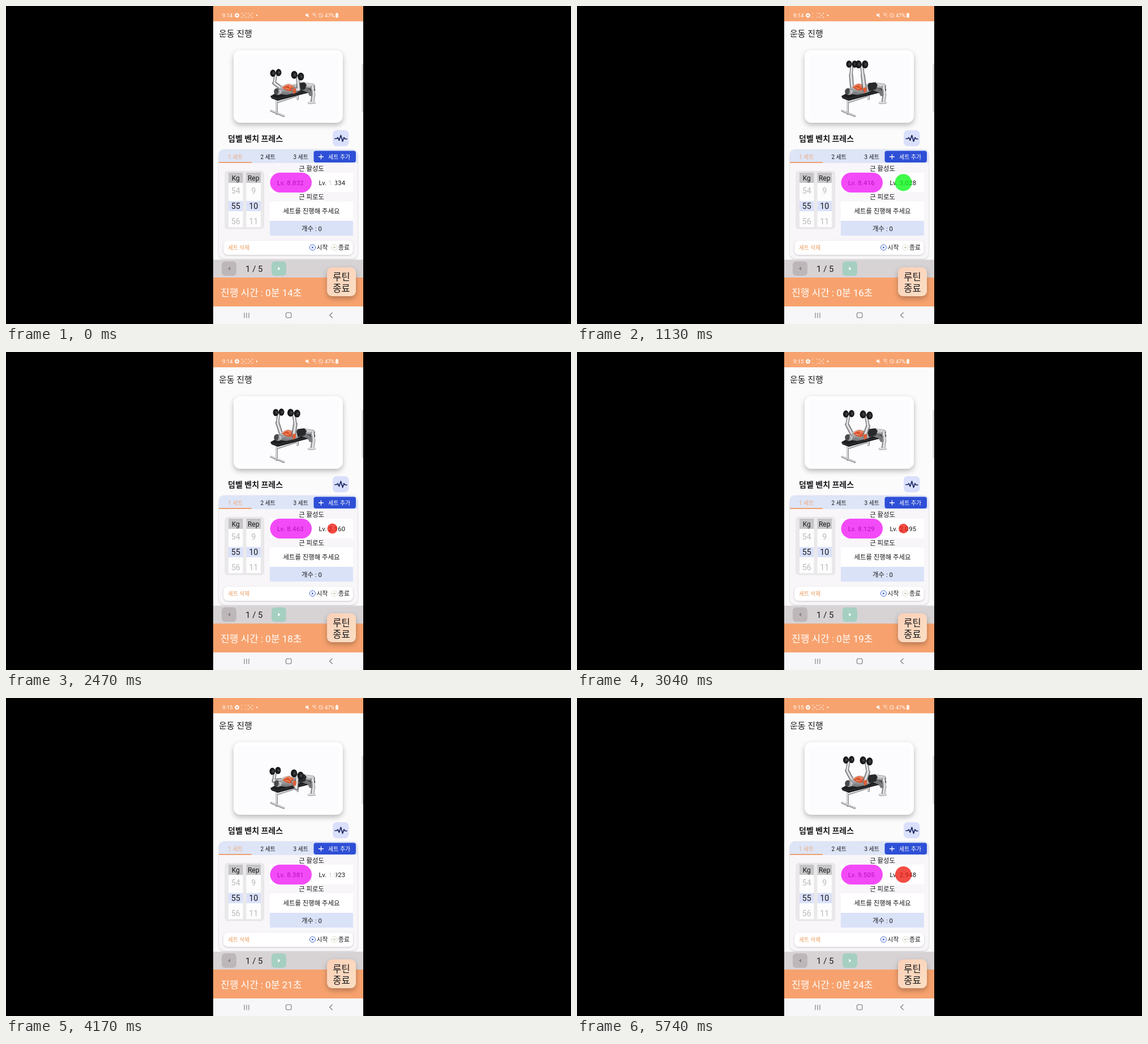
Write an HTML page that moves like this. It is 998 px wide and 561 px high and loops after 5.77 s.

```html
<!DOCTYPE html>
<html lang="ko">
<head>
<meta charset="utf-8">
<style>
html, body { margin: 0; width: 100%; height: 100%; overflow: hidden; background: #000; }
svg { display: block; width: 100vw; height: 100vh; }
text { font-family: Roboto, "Noto Sans CJK KR", "Noto Sans CJK", sans-serif; font-size: 11.4px; fill: #18181b; }
.mid { text-anchor: middle; }
.tab { font-size: 10px; }
.wheel { font-size: 14.2px; text-anchor: middle; }
.dim { fill: #bcbbbf; }
.card { filter: drop-shadow(0 4px 5px #0004); }
.low { filter: drop-shadow(0 1.5px 1.5px #0003); }
.line { fill: none; stroke-linecap: round; stroke-linejoin: round; }
</style>
</head>
<body>
<svg viewBox="0 0 998 561">
  <defs>
    <linearGradient id="peach" x2="1" y2="1"><stop stop-color="#fbd0b8"/><stop offset="1" stop-color="#fadfc4"/></linearGradient>
    <linearGradient id="skin" x2="0" y2="1"><stop stop-color="#e4e4e5"/><stop offset="1" stop-color="#6f7073"/></linearGradient>
  </defs>
  <rect x="366" width="265" height="561" fill="#fcfbfc"/>
  <rect x="366" width="265" height="27" fill="#f7a36f"/>

  <!-- status bar -->
  <g fill="#fff">
    <text id="clock" x="382" y="20" style="font-size:9.6px;fill:#fff"></text>
    <circle cx="408" cy="16.5" r="2.5" class="line" stroke="#fff" stroke-width="2"/>
    <circle cx="408" cy="16.5" r="3.7" class="line" stroke="#fff" stroke-width="1" stroke-dasharray="1.4 1.5"/>
    <g class="line" stroke="#fff" stroke-width=".8" stroke-opacity=".85">
      <path id="corners" d="M416 14v-1.500h1.500m5 0h1.500v1.500m0 5v1.500h-1.500m-5 0h-1.500v-1.500"/>
      <path id="cross" d="M418.500 15l3 3m0-3l-3 3"/>
      <path d="M427.500 14v-1.500h1.500m5 0h1.500v1.500m0 5v1.500h-1.500m-5 0h-1.500v-1.500M430 15l3 3m0-3l-3 3"/>
      <path d="M529 13l7 7M541 14q3.500-2.500 7 0M542.500 16.500q2-1.500 4 0M542 13l6 7"/>
      <circle cx="556" cy="16.500" r="3.500"/><path d="M553.500 14l5 5"/>
    </g>
    <circle cx="443" cy="16.500" r="1.300"/>
    <path d="M529 15h2l3-2.500v7.500l-3-2.500h-2z"/>
    <text x="563" y="20" style="font-size:9.4px;fill:#fff">47%</text>
    <rect x="582" y="13" width="5" height="7.500" rx="1" opacity=".85"/><rect x="583.500" y="12" width="2" height="2" opacity=".85"/>
  </g>

  <text x="376" y="54" style="font-size:15px">운동 진행</text>
  <rect x="628.500" y="102" width="2.500" height="85" rx="1" fill="#d9d8db"/>

  <!-- exercise card -->
  <rect class="card" x="402" y="78" width="193" height="128" rx="12" fill="#fefeff"/>
  <rect x="410" y="85" width="178" height="114" rx="3" fill="#fcfbfe"/>
  <g class="line">
    <path d="M478 166v24M515 154v10M480 169l34-11" stroke="#8d8e91" stroke-width="4"/>
    <path d="M477.500 166v24M514.500 154v10M480 168.500l34-11" stroke="#e4e4e6" stroke-width="2.200"/>
    <path d="M468.500 185l22 9" stroke="#7f8083" stroke-width="3.500"/>
    <path d="M468.500 184.500l22 9" stroke="#e0e0e2" stroke-width="1.800"/>
  </g>
  <path d="M467 159l9-5 64-11 6 3v4l-66 17-11-4z" fill="#1d1e20"/>
  <path d="M469 160.500l10 3 65-15.500" class="line" stroke="#414346" stroke-width=".8"/>
  <g id="farArm" class="line"></g>
  <g id="farBell"></g>
  <g class="line">
    <path d="M524 146l11 4 3 6" stroke="#77787b" stroke-width="6"/>
    <path d="M526 140l15 2" stroke="#6f7073" stroke-width="10"/>
    <path d="M527 139l14 2" stroke="#d3d3d5" stroke-width="7"/>
    <path d="M541 144l2 12-2 13" stroke="#77787b" stroke-width="6.500"/>
    <path d="M541.500 143l2 12-2 14" stroke="#dededf" stroke-width="4"/>
    <path d="M535 171l10-.5" stroke="#a9aaac" stroke-width="4"/>
    <path d="M535 170.500l10-.5" stroke="#dededf" stroke-width="2.500"/>
    <path d="M529 141l9 1.500M541 148v10" stroke="#929396"/>
  </g>
  <path d="M481 150q3-9 12-12 7-3 14 0l13-2 6 10-13 7-18 4-13-2z" fill="url(#skin)"/>
  <path d="M507 139l7-1 4 10-11 4z" fill="#bfc0c2"/>
  <path d="M509 141l3 8m1-10l3 9m-22 3l-5 4" class="line" stroke="#727376"/>
  <path d="M515 136l12-1.500 4 4.500-3 8-12 3q-4-7-1-14z" fill="#28292b"/>
  <ellipse cx="480.500" cy="151" rx="7" ry="6" fill="#9b9c9f"/>
  <path d="M473.500 153q-1-8 6-8l3 3-3 8q-4 1-6-3z" fill="#48494c"/>
  <path d="M482 149l4 1-2 4" class="line" stroke="#dadadc" stroke-width="1.500"/>
  <g id="chest">
    <path d="M487 143q5-6 11-6l9 3q0 6-5 9-8 1-15-6z" fill="#d9532c"/>
    <path d="M489 142q4-4 9-3l4 5M500 139l6 3M492 144l7 2" class="line" stroke="#f3a283" stroke-width="1.200"/>
  </g>
  <g id="nearArm" class="line"></g>
  <path id="delt" d="M505 146q3-5 7-1l-1 6-4 3z" fill="#dc6038"/>
  <g id="nearBell"></g>

  <text x="392" y="239" style="font-size:14px;font-weight:700">덤벨 벤치 프레스</text>
  <rect x="577" y="219" width="28.500" height="28.500" rx="7" fill="#dae0fb"/>
  <path d="M581 234h3l2-2 2.500 5 3-9 3 11 2.500-7 2 2.500h3" class="line" stroke="#17235f" stroke-width="1.700"/>

  <!-- set panel -->
  <rect class="low" x="376" y="253" width="245" height="193" rx="10" fill="#f8f6f9"/>
  <path d="M376 277v-14q0-10 10-10h225q10 0 10 10v14z" fill="#dde5f7"/>
  <rect x="376" y="275" width="58" height="2" fill="#f0a070"/>
  <text class="tab" x="392" y="269.500" style="fill:#f0aa80">1 세트</text>
  <text class="tab" x="449.500" y="269.500">2 세트</text>
  <text class="tab" x="507.500" y="269.500">3 세트</text>
  <rect x="543.500" y="255.500" width="74.500" height="20.500" rx="4" fill="#2e4fd6"/>
  <path d="M552.500 266h8m-4-4v8" class="line" stroke="#fff" stroke-width="1.300"/>
  <text class="tab" x="569" y="269.500" style="fill:#fff">세트 추가</text>

  <rect x="387" y="291.500" width="68.500" height="101.500" rx="5" fill="#eae8ea" stroke="#dfdddf" stroke-width=".7"/>
  <g id="wheels"></g>

  <text class="mid" x="539.500" y="291">근 활성도</text>
  <rect x="466" y="294" width="147" height="34.500" fill="#fff"/>
  <text id="left" x="479" y="316" letter-spacing=".25"></text>
  <text id="right" x="552.500" y="316" letter-spacing=".25"></text>
  <rect x="466.500" y="294" width="73.500" height="35" rx="17.500" fill="#ef0cf6" fill-opacity=".74"/>
  <circle id="dot" cx="576.500" cy="311.500" fill-opacity=".78"/>
  <text class="mid" x="539.500" y="341">근 피로도</text>
  <rect x="466" y="345" width="147" height="34" fill="#fff"/>
  <text class="mid" x="539.500" y="366">세트를 진행해 주세요</text>
  <rect x="466" y="379" width="147" height="26" fill="#dae2f8"/>
  <text class="mid" x="540" y="397">개수 : 0</text>

  <rect class="low" x="384" y="414" width="229" height="25" rx="8" fill="#fff"/>
  <text x="392" y="430" style="font-size:9.7px;fill:#e89a5c">세트 삭제</text>
  <circle cx="541.500" cy="426" r="5" fill="none" stroke="#3b62d2"/>
  <path d="M540.200 424v4l3.400-2z" fill="#2e55cc"/>
  <text x="548.500" y="430" style="font-size:10.800px">시작</text>
  <circle cx="580" cy="426" r="5" fill="none" stroke="#dddccb"/>
  <rect x="578" y="424.800" width="4" height="2.500" fill="#cfd0bd"/>
  <text x="587" y="430" style="font-size:10.800px">종료</text>

  <!-- pager and footer -->
  <rect x="366" y="447.500" width="265" height="31.500" fill="#d7d3d5"/>
  <rect x="381" y="450.500" width="26" height="25.500" rx="6" fill="#bdb7ba"/>
  <path d="M396 460v6.500l-4-3.200z" fill="#857f84"/>
  <text x="423" y="469" style="font-size:15px">1 / 5</text>
  <rect x="469" y="450.500" width="26" height="25.500" rx="6" fill="#a5cfc1"/>
  <path d="M480.500 460v6.500l4-3.200z" fill="#fff"/>
  <rect x="366" y="479" width="265" height="51" fill="#f7a26e"/>
  <text id="timer" x="379" y="511.500" style="font-size:17px;fill:#fff"></text>
  <rect class="card" x="567" y="461" width="51" height="51" rx="9" fill="url(#peach)"/>
  <text class="mid" x="592.500" y="484" style="font-size:16.500px">루틴</text>
  <text class="mid" x="592.500" y="504" style="font-size:16.500px">종료</text>
  <rect x="366" y="530" width="265" height="31" fill="#f7f6f8"/>
  <g class="line" stroke="#77777a" stroke-width="1.100">
    <path d="M421 541.500v8.500m4-8.500v8.500m4-8.500v8.500M576.500 541l-5 4.500 5 4.500"/>
    <rect x="494.500" y="541" width="9.500" height="9" rx="2.500"/>
  </g>
</svg>
<script>
const LOOP = 5770;
const $ = id => document.getElementById(id);
const mix = (a, b, k) => a + (b - a) * k;

// Arm poses from lockout to bottom: far hand, near hand, far elbow, near elbow
const poses = [
  [485.5, 102.5, 503, 103, 484, 122, 505, 123],
  [483, 104, 506, 105, 482, 122, 508, 124],
  [480, 109, 511, 111, 477, 128, 514, 131],
  [476.5, 118, 515, 123, 474, 136, 517, 147],
  [475.5, 128.5, 514.5, 135, 473, 146, 513, 159]
];
// [time, pose]
const lift = [[0, 3], [730, 2], [1130, 0], [1500, 0], [1940, 1], [3040, 2], [3650, 3], [4170, 4], [5010, 3], [5740, 2], [LOOP, 2]];
// [time, left level, right level]
const levels = [[0, 8.832, 1.334], [1130, 8.416, 3.028], [1940, 8.63, 2.192], [3040, 8.129, 2.095],
  [4170, 8.381, 1.923], [5010, 9.41, 3.434], [5740, 9.505, 2.948], [LOOP, 9.505, 2.948]];

// Values between two keys; steps > 0 makes them jump like sensor readings
function sample(keys, t, steps) {
  let i = 0;
  while (i < keys.length - 2 && t >= keys[i + 1][0]) i++;
  const [a, b] = [keys[i], keys[i + 1]];
  let k = (t - a[0]) / (b[0] - a[0]);
  if (steps) k = Math.floor(k * steps) / steps;
  return a.slice(1).map((v, j) => mix(v, b[j + 1], k));
}

function bell(x, y, gap, tilt, r) {
  const disc = side => {
    const cx = x + side * gap, cy = y + side * tilt;
    return `<ellipse cx="${cx}" cy="${cy}" rx="${r}" ry="${r + 1.3}" fill="#151618"/>
      <ellipse cx="${cx + 1}" cy="${cy}" rx="${r * .55}" ry="${r * .7}" fill="#2b2d30"/>
      <circle cx="${cx + 1}" cy="${cy}" r=".8" fill="#77797e"/>`;
  };
  return `<path d="M${x - gap} ${y - tilt}L${x + gap} ${y + tilt}" stroke="#77787c" stroke-width="2.5"/>` + disc(-1) + disc(1);
}

function arm(sx, sy, ex, ey, hx, hy, w) {
  const upper = `M${sx} ${sy}L${ex} ${ey}`, fore = `M${ex} ${ey}L${hx} ${hy + 2}`;
  const stroke = (d, color, width) => `<path d="${d}" stroke="${color}" stroke-width="${width}"/>`;
  return stroke(upper, '#66676a', w + 2.5) + stroke(fore, '#66676a', w + 1)
    + stroke(upper, '#c4c4c7', w) + stroke(fore, '#c4c4c7', w - 1)
    + stroke(upper + fore, '#eeeeef', 1.6);
}

function drawLifter(t) {
  const [level] = sample(lift, t);
  const i = Math.min(3, Math.floor(level));
  const [lx, ly, rx, ry, lex, ley, rex, rey] = poses[i].map((v, j) => mix(v, poses[i + 1][j], level - i));
  $('farArm').innerHTML = arm(486, 145, lex, ley, lx, ly, 4.5);
  $('nearArm').innerHTML = arm(508, 148, rex, rey, rx, ry, 5);
  $('farBell').innerHTML = bell(lx, ly, 5, -level * .2, 5);
  $('nearBell').innerHTML = bell(rx, ry, 5.8, level * .5, 5.6);
  $('chest').setAttribute('transform', `translate(${level * .4} ${level * .3})`);
  $('delt').setAttribute('transform', `translate(${level * .3} ${level * .6})`);
}

function draw(now) {
  const t = now % LOOP;
  const [left, right] = sample(levels, t, 3);
  $('left').textContent = 'Lv. ' + left.toFixed(3);
  $('right').textContent = 'Lv. ' + right.toFixed(3);
  $('dot').setAttribute('r', Math.max(6, 8.5 + (right - 2.1) * 7));
  $('dot').setAttribute('fill', right < 2 ? '#fff' : right < 3 ? '#ef1a10' : '#08f816');
  $('timer').textContent = `진행 시간 : 0분 ${Math.floor(14.15 + t / 575)}초`;
  $('clock').textContent = t < 2500 ? '9:14' : '9:15';
  const faded = t > 700 && t < 1550 || t > 2500 && t < 4600;
  $('cross').style.opacity = faded ? 0 : 1;
  $('corners').style.opacity = faded ? .6 : 1;
  drawLifter(t);
  requestAnimationFrame(draw);
}

const wheel = (x, title, value) => `<rect x="${x}" y="294" width="25.5" height="96" fill="#fdfdfd"/>
  <rect x="${x}" y="294" width="25.5" height="18" fill="#c5c4c7"/>
  <rect x="${x}" y="344" width="25.5" height="18" fill="#dae1fa"/>
  <text class="mid" x="${x + 12.7}" y="308" style="font-size:12px">${title}</text>` +
  [-1, 0, 1].map(k => `<text class="wheel ${k ? 'dim' : ''}" x="${x + 12.7}" y="${358 + k * 27}">${value + k}</text>`).join('');
$('wheels').innerHTML = wheel(393, 'Kg', 55) + wheel(424.5, 'Rep', 10);

requestAnimationFrame(draw);
</script>
</body>
</html>
```
